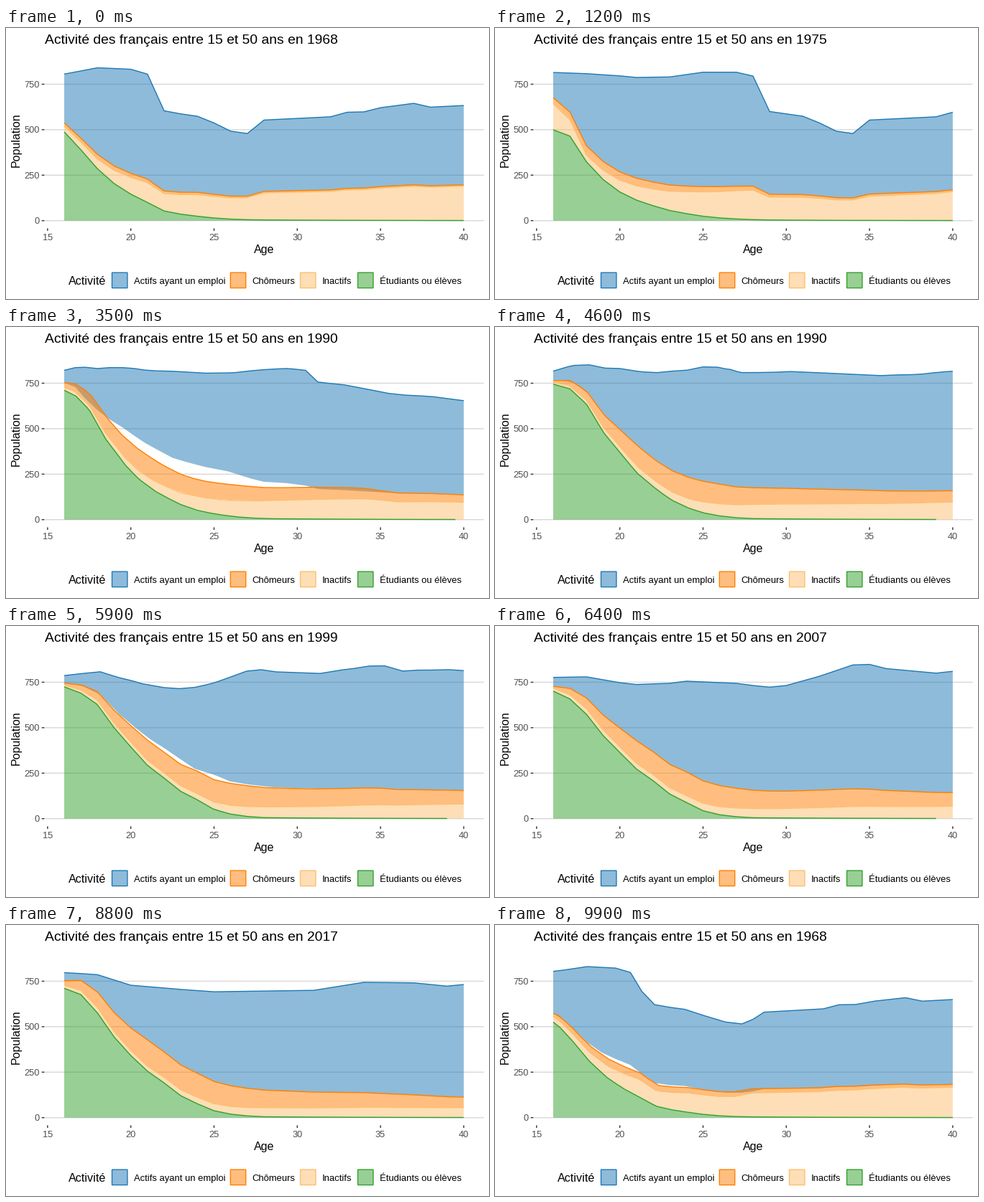
Animation, 672 px wide and 378 px high, one loop 10000 ms. Source, as a matplotlib script:

```python
import matplotlib.pyplot as plt
import numpy as np
from matplotlib.animation import FuncAnimation
from matplotlib.patches import Polygon, Rectangle

W, H, DPI = 672, 378, 96
PX = 72 / DPI
FRAMES, STEP_MS = 100, 100
STARTS = [7, 20, 33, 46, 59, 71, 83, 95]
STEPS = 6
PATH_POINTS = 50
LINE = 1.4 * PX

BLUE, ORANGE, SAND, GREEN = "#1F78B4", "#FF7F00", "#FDBF6F", "#33A02C"
AGES = np.arange(16, 41)

plt.rcParams["font.family"] = "Liberation Sans"

# Size of each generation, by year of birth (turning points only)
BORN = {
    1928: 633, 1930: 624, 1931: 645, 1933: 621, 1934: 598, 1935: 596,
    1936: 571, 1940: 553, 1941: 479, 1942: 492, 1943: 537, 1944: 574,
    1946: 600, 1947: 795, 1948: 816, 1950: 816, 1952: 790, 1954: 782,
    1957: 800, 1960: 822, 1962: 819, 1963: 812, 1964: 844, 1965: 842,
    1966: 820, 1968: 800, 1971: 825, 1972: 848, 1973: 845, 1975: 783,
    1977: 732, 1978: 723, 1980: 741, 1983: 744, 1986: 700, 1992: 692,
    1994: 705, 1997: 700, 1999: 708, 2001: 752}

GAIN_AGES = [16, 18, 20, 23, 28, 33]
SHARE_AGES = [16, 18, 21, 24, 28, 40]
STUDY_AGES = [16, 17, 18, 20, 22, 24, 28, 40]


def generations(year, gain):
    """People per age: their generation, plus a gain in % when young."""
    size = np.interp(year - AGES, list(BORN), list(BORN.values()))
    return size * (1 + np.interp(AGES, GAIN_AGES, gain + [0]) / 100)


def shares(jobless, inactive, students):
    """Share of each age in %; studies fade geometrically with age."""
    study = np.log(students + [0.7, 0.1])
    return np.array([np.interp(AGES, SHARE_AGES, jobless),
                     np.interp(AGES, SHARE_AGES, inactive),
                     np.exp(np.interp(AGES, STUDY_AGES, study))])


def stack(year, gain, parts):
    """Upper edges of the four groups, from top to bottom."""
    total = generations(year, gain)
    cumulated = np.cumsum(parts[::-1], axis=0)[::-1]
    return np.vstack([total, total * cumulated / 100])


mix_1999 = shares([1.3, 5.4, 15.1, 16.4, 13.2, 9], [1.1, 2.9, 3.8, 4.4, 7.6, 10.1],
                  [92.5, 86.8, 78, 54.2, 31.8, 14.2])
mix_2012 = shares([1.3, 9.7, 18.7, 18.1, 14.2, 9.4], [3, 5.1, 4.7, 5.6, 6.3, 6.7],
                  [88.1, 82.4, 69.1, 43.1, 24.5, 9.3])

SURVEYS = {
    1968: ([2, 3, 2, 0, 0],
           shares([2.1, 3, 2.4, 2.2, 1.5, 1.1], [4, 6.4, 13.5, 20.7, 26.9, 29.9],
                  [60.6, 47.3, 33.9, 17.5, 8.8, 4.2])),
    1975: ([0, 1, 1, 0, 0],
           shares([4, 6.3, 5.3, 3.8, 2.8, 1.7], [17.7, 4.6, 10, 15.1, 20.4, 26.7],
                  [61.3, 57.3, 40, 19.8, 10.4, 4.8])),
    1982: ([0, -1, -1, -3, -1],
           shares([5.5, 14.5, 14.1, 9, 6.5, 4.5], [2.2, 4.2, 7.2, 11.7, 15.1, 18.4],
                  [82.3, 68.8, 48.9, 24, 11.9, 5])),
    1990: ([1, 2, 4, 2.5, -1],
           shares([1.1, 5.8, 13.8, 13.9, 10.9, 7.2], [1.3, 2.7, 4.7, 6.5, 10.1, 12.2],
                  [91, 84.4, 73.2, 42.8, 21, 7.6])),
    1999: ([6, 10, 1, -5, -2], mix_1999),
    2007: ([12, 12, 7, 2, 0], (mix_1999 + mix_2012) / 2),
    2012: ([6, 11, 9, 5, 0], mix_2012),
    2017: ([6, 11, 4, 0, 0],
           shares([3.1, 10.8, 20, 18.9, 13.9, 7.8], [2.1, 3.8, 3.9, 5.1, 7.2, 7.5],
                  [89.2, 85.4, 73.2, 46.9, 26.8, 10.9])),
}
YEARS = list(SURVEYS)
NO_LAST_STUDENTS = {1990, 1999, 2007}


def px_x(age):
    return 57.85 + (np.asarray(age) - 15) * 23.16


def px_y(count):
    return 268.7 - np.asarray(count) * 0.2537


def densify(x, low, high):
    """Split the longest segments until the path has PATH_POINTS points."""
    length = np.hypot(np.diff(x), np.diff(high))
    parts = np.ones(len(length), int)
    while parts.sum() < PATH_POINTS - 1:
        parts[np.argmax(length / parts)] += 1
    pos = np.concatenate([i + np.arange(p) / p for i, p in enumerate(parts)])
    pos = np.r_[pos, len(length)]
    index = np.arange(len(x))
    return np.array([np.interp(pos, index, v) for v in (x, low, high)])


def layer_paths(year):
    tops = stack(year, *SURVEYS[year])
    lows = np.vstack([tops[1:], np.zeros(len(AGES))])
    paths = [densify(AGES, low, high) for low, high in zip(lows, tops)]
    if year in NO_LAST_STUDENTS:
        paths[-1] = densify(AGES[:-1], lows[-1, :-1], tops[-1, :-1])
    return np.array(paths)


PATHS = [layer_paths(year) for year in YEARS]

fig = plt.figure(figsize=(W / DPI, H / DPI), dpi=DPI, facecolor="white")
ax = fig.add_axes([0, 0, 1, 1])
ax.set_xlim(0, W)
ax.set_ylim(H, 0)
ax.axis("off")


def label(x, y, text, size, color="black", **kw):
    kw.setdefault("va", "baseline")
    return ax.text(x, y, text, fontsize=size * PX, color=color, **kw)


def rule(xs, ys, color):
    ax.plot(xs, ys, color=color, lw=LINE, solid_capstyle="butt",
            snap=False, zorder=1)


# Grid, ticks and axis labels
for count in (0, 250, 500, 750):
    y = float(px_y(count))
    rule([53.3, 664.7], [y, y], "#D8D8D8")
    rule([49.7, 53.3], [y, y], "#333333")
    label(47, y + 4.6, str(count), 12.8, "#4D4D4D", ha="right")
for age in range(15, 41, 5):
    x = float(px_x(age))
    rule([x, x], [279.4, 283], "#333333")
    label(x, 296.3, str(age), 12.8, "#4D4D4D", ha="center")
label(359, 314.3, "Age", 16, ha="center")
label(22, 156.5, "Population", 16, ha="right", va="center", rotation=90)
title = label(54, 22.3, "", 19.25)

# Legend
label(87, 358, "Activité", 16.1)
for x, color, name in [(147.5, BLUE, "Actifs ayant un emploi"),
                       (312.3, ORANGE, "Chômeurs"),
                       (409.5, SAND, "Inactifs"),
                       (489.5, GREEN, "Étudiants ou élèves")]:
    box = dict(width=21.4, height=21.4, lw=LINE, snap=False)
    ax.add_patch(Rectangle((x, 341.2), fc=color, ec="none", alpha=0.5, **box))
    ax.add_patch(Rectangle((x, 341.2), fc="none", ec=color, **box))
    label(x + 30.5, 356.8, name, 12.95)

areas, edges = [], []
for i, color in enumerate((BLUE, ORANGE, SAND, GREEN)):
    area = Polygon(np.zeros((3, 2)), closed=True, fc=color, ec="none",
                   alpha=0.5, zorder=2 + i)
    areas.append(ax.add_patch(area))
    edges += ax.plot([], [], color=color, lw=LINE, solid_capstyle="butt",
                     solid_joinstyle="round", zorder=2.5 + i)


def progress(frame):
    """Current survey, next survey and the number of steps between them."""
    begun = [i for i, start in enumerate(STARTS) if frame >= start]
    if not begun:
        return 0, 0, 0
    i = begun[-1]
    return i, (i + 1) % len(YEARS), min(frame - STARTS[i] + 1, STEPS)


def draw(frame):
    a, b, step = progress(frame)
    paths = PATHS[a] + (PATHS[b] - PATHS[a]) * step / STEPS
    for (x, low, high), area, edge in zip(paths, areas, edges):
        x, low, high = px_x(x), px_y(low), px_y(high)
        area.set_xy(np.c_[np.r_[x, x[::-1]], np.r_[high, low[::-1]]])
        edge.set_data(x, high)
    year = YEARS[b if 2 * step >= STEPS else a]
    title.set_text(f"Activité des français entre 15 et 50 ans en {year}")
    return [title, *areas, *edges]


anim = FuncAnimation(fig, draw, frames=FRAMES, interval=STEP_MS,
                     repeat=True, repeat_delay=0)
plt.show()
```
